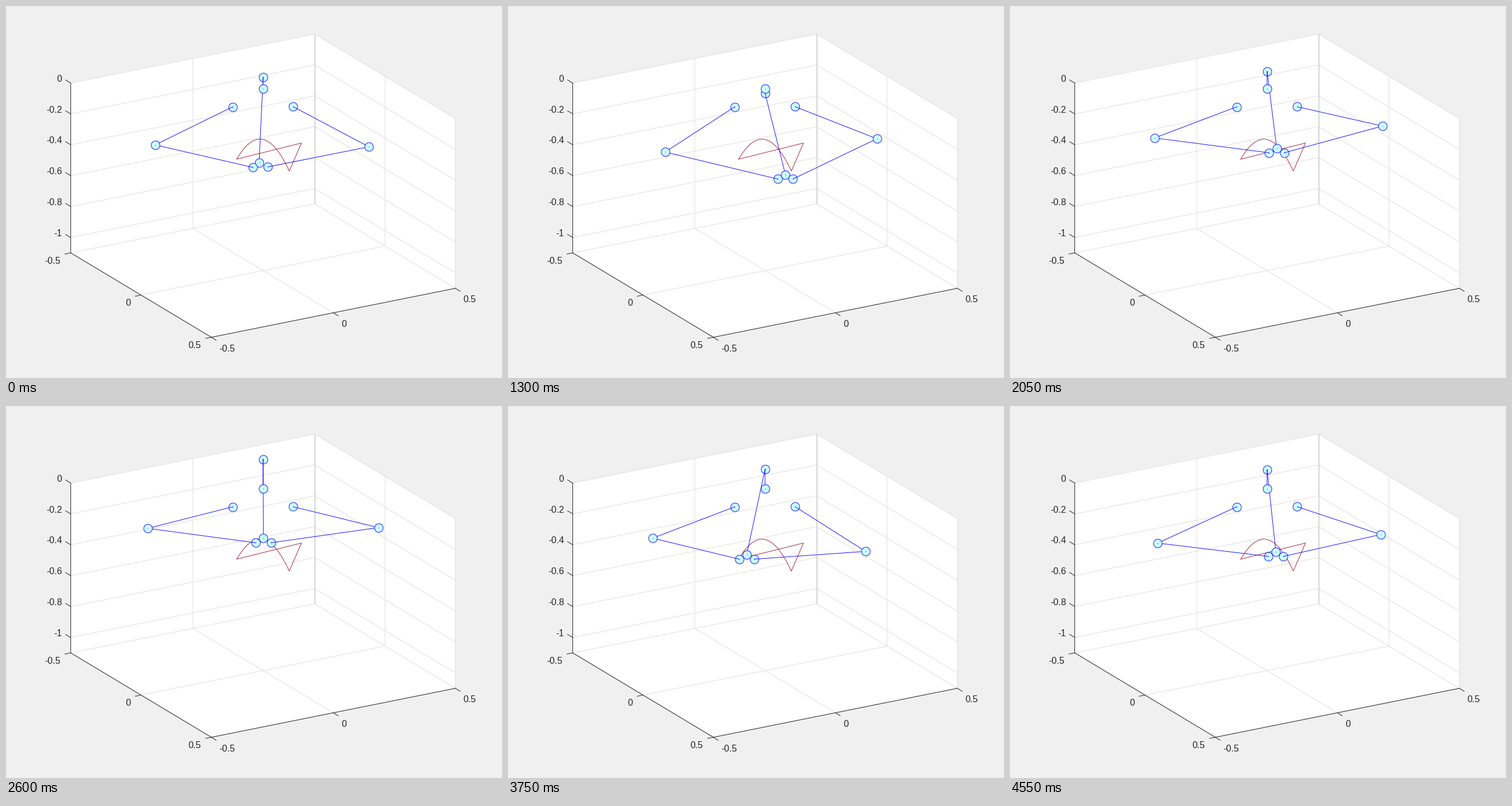
A matplotlib script that plays this animation: 864 px wide and 648 px high, repeating every 4.6 s.

```python
import numpy as np
import matplotlib.pyplot as plt
from matplotlib.animation import FuncAnimation

W, H, DPI = 864, 648, 100
FRAMES, STEP = 92, 50
PX = 72 / DPI
BLUE, AXIS, GRID, PATH = "#0000ff", "#262626", "#dfdfdf", "#a2142f"
LO, HI, FLOOR = -0.5, 0.5, -1.1

# Delta robot: base and platform radii, upper and lower link lengths
R_BASE, R_PLAT, UPPER, LOWER = 0.124, 0.031, 0.35, 0.5
ANGLES = np.radians([150, -90, 30])


def arc(x):
    """Point of the curved stroke the platform follows."""
    return np.array([x, x / 2, -0.261 - 31 * (x + 0.004) ** 2])


# Platform strokes: home, top corner, start and end of the arc, last pose
TIMES = np.array([0, 460, 1290, 4060, 4550])
STOPS = np.array([(-0.020, -0.001, -0.431), (0.079, 0.083, -0.290),
                  arc(0.078), arc(-0.085), (0.010, 0.0305, -0.355)])
ARC_STROKE = 2


def centre_at(t):
    """Platform centre: a slightly eased glide along each stroke."""
    i = min(np.searchsorted(TIMES, t, side="right") - 1, len(TIMES) - 2)
    s = (t - TIMES[i]) / (TIMES[i + 1] - TIMES[i])
    s = 0.75 * s + 0.25 * s * s * (3 - 2 * s)
    c = STOPS[i] + s * (STOPS[i + 1] - STOPS[i])
    return arc(c[0]) if i == ARC_STROKE else c


def project(p):
    """Map data coordinates to stage pixels."""
    x, y, z = np.asarray(p, float).T
    return 447.7 + 245 * x + 425 * y, 165 + 147 * x - 85.3 * y - 269 * z


def layer(p):
    """Stacking order by closeness to the viewer."""
    x, y, z = p
    return 10 + 0.46 * (0.866 * x - 0.5 * y) + 0.098 * z


def radial(angle):
    return np.array([np.cos(angle), np.sin(angle), 0.0])


def leg(angle, c, twist):
    """Base, elbow and platform joints of one leg."""
    u = radial(angle)
    along = c @ u
    side2 = c[0] ** 2 + c[1] ** 2 - along ** 2
    a, d = R_BASE - R_PLAT - along, -c[2]
    k = LOWER ** 2 - side2 - a * a - d * d - UPPER ** 2
    theta = np.arccos(k / (2 * UPPER * np.hypot(a, d))) - np.arctan2(d, a)
    base = R_BASE * u
    elbow = base + UPPER * (np.cos(theta) * u - [0, 0, np.sin(theta)])
    return base, elbow, c + R_PLAT * radial(angle + twist)


fig = plt.figure(figsize=(W / DPI, H / DPI), dpi=DPI, facecolor="#f0f0f0")
ax = fig.add_axes([0, 0, 1, 1])
ax.set_xlim(0, W)
ax.set_ylim(H, 0)
ax.axis("off")


def line3(points, color, width=1.0, z=1):
    ax.plot(*project(points), color=color, lw=width * PX, zorder=z,
            solid_joinstyle="miter")


def tick(p, value, mark, text, ha):
    """Tick mark and label, both given as pixel offsets from p."""
    x, y = project(p)
    ax.plot([x, x + mark[0]], [y, y + mark[1]], color=AXIS, lw=PX, zorder=3)
    ax.text(x + text[0], y + text[1] + 5.7, f"{value:g}", ha=ha,
            va="baseline", color=AXIS, family="Liberation Sans",
            fontsize=16 * PX)


def draw_box():
    corners = [(LO, LO), (LO, HI), (HI, HI), (HI, LO)]
    floor = [(x, y, FLOOR) for x, y in corners]
    top = [(x, y, 0) for x, y in corners]
    for face in (floor, floor[:2] + top[1::-1], floor[1:3] + top[2:0:-1]):
        ax.fill(*project(face), color="white", lw=0, zorder=0)

    for v in (LO, 0, HI):
        line3([(v, LO, FLOOR), (v, HI, FLOOR), (v, HI, 0)], GRID)
        line3([(HI, v, FLOOR), (LO, v, FLOOR), (LO, v, 0)], GRID)
        tick((v, LO, FLOOR), v, (-10, 2), (-18, 13), "right")
        tick((HI, v, FLOOR), v, (8.5, 5.2), (14, 19), "left")
    for i in range(6):
        z = -i / 5 if i else 0
        line3([(LO, LO, z), (LO, HI, z), (HI, HI, z)], GRID)
        tick((LO, LO, z), z, (-9, -5.4), (-15, -8), "right")
    line3([floor[1], top[1]], "#cccccc")
    line3([top[0], floor[0], floor[3], floor[2]], AXIS, z=3)


def draw_path():
    x = np.linspace(-0.1, 0.1, 80)
    high, low = -0.251, -0.417
    curve = np.column_stack([x, x / 2, high + (low - high) * (x / 0.1) ** 2])
    line3([*curve, (0.1, 0.1, high), (-0.1, -0.05, low)], PATH, 0.9, z=4)


def joint_art(size, fill, edge):
    return [ax.plot([], [], "o", ms=size * PX, mfc=fill, mec=BLUE,
                    mew=edge * PX)[0] for _ in range(9)]


draw_box()
draw_path()
links = [ax.plot([], [], color=BLUE, lw=0.9 * PX)[0] for _ in range(6)]
discs = joint_art(15, "#ccffff", 0.9)
dots = joint_art(1.1, BLUE, 0)


def place_link(art, a, b):
    """Draw a link, cut off where it rises above z = 0."""
    art.set_zorder(layer((a + b) / 2))
    if a[2] > 0:
        a, b = b, a
    if b[2] > 0:
        b = a + (b - a) * a[2] / (a[2] - b[2])
    art.set_data(*project([a, b]))


def place_joint(disc, dot, p):
    x, y = project(p)
    for art, lift in ((disc, 0), (dot, 1e-5)):
        art.set_data([x], [y])
        art.set_zorder(layer(p) + lift)
        art.set_visible(p[2] <= 0)


def update(frame):
    t = frame * STEP
    c = centre_at(t)
    twist = 0.1 * np.exp(-t / 150)
    for i, angle in enumerate(ANGLES):
        joints = leg(angle, c, twist)
        for j in range(2):
            place_link(links[2 * i + j], joints[j], joints[j + 1])
        for j, p in enumerate(joints):
            place_joint(discs[3 * i + j], dots[3 * i + j], p)
    return links + discs + dots


anim = FuncAnimation(fig, update, frames=FRAMES, interval=STEP,
                     repeat=True, repeat_delay=0, blit=False)
plt.show()
```
